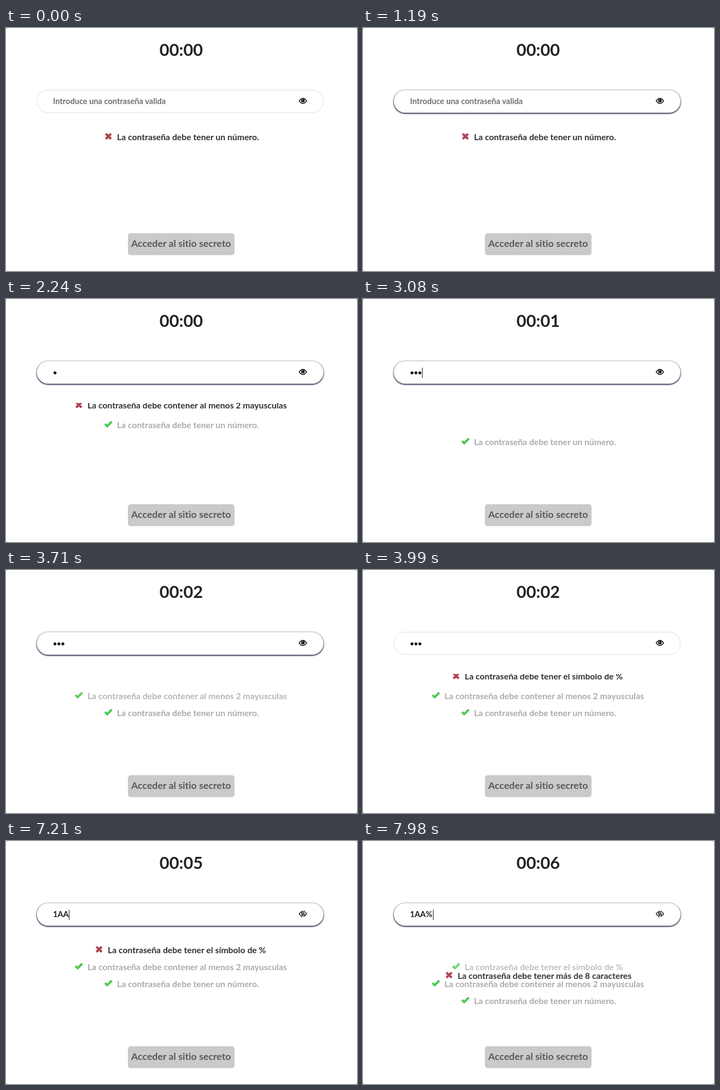
An HTML page that plays this animation: 642x444 px, repeating every 8 s.

```html
<!DOCTYPE html>
<html lang="es">
<head>
<meta charset="utf-8">
<title>Contraseña</title>
<style>
  html, body { margin: 0; width: 100%; height: 100%; overflow: hidden; background: #777; }
  svg { position: absolute; left: 0; top: 0; }
  text { font: 700 15.75px Lato, "Open Sans", sans-serif; font-variant-ligatures: none; white-space: pre; }
  #field { position: absolute; left: 56px; top: 113px; width: 523px; height: 40px;
    border: 1px solid #dfdfdf; border-radius: 21px; background: #fff; }
  #field.active { border-color: #dcdce0;
    box-shadow: 0 1.5px 2px .5px rgba(50, 40, 75, .85), 0 0 0 1px #d9d9de; }
</style>
</head>
<body>
<svg width="642" height="444"><rect width="642" height="444" rx="2.5" fill="#fff"/></svg>
<div id="field"></div>
<svg width="642" height="444" viewBox="0 0 642 444">
  <defs>
    <clipPath id="clip"><rect id="window" x="0" y="190" width="642" height="100"/></clipPath>
    <path id="cross" d="M-4.8-4.8L4.8 4.8M4.8-4.8L-4.8 4.8" stroke="#b04352" stroke-width="4.2"/>
    <path id="check" d="M-6.2-.4L-2.2 3.4L6.2-5" fill="none" stroke="#4fc853" stroke-width="4.1"/>
  </defs>
  <text id="timer" x="320.5" y="51" text-anchor="middle" fill="#222" style="font-size:30.8px"></text>
  <text id="value" x="86" y="139" style="font-size:14.6px"></text>
  <g id="dots" fill="#1c1c1c">
    <circle cx="89.6" cy="135" r="2.7"/><circle cx="96.8" cy="135" r="2.7"/><circle cx="104" cy="135" r="2.7"/>
  </g>
  <path id="caret" d="M0 125.5V144" stroke="#111" stroke-width="1"/>
  <g id="eye" fill="none" stroke="#1c1c1c" stroke-width="1.6">
    <path d="M536.3 133.2Q543 123.8 549.8 133.2Q543 142.6 536.3 133.2Z"/>
    <circle cx="543" cy="132.4" r="3.4" fill="#1c1c1c" stroke="none"/>
    <path d="M541.2 132.4Q541.3 130.6 543 130.5" stroke="#fff" stroke-width=".9"/>
  </g>
  <g id="eyeOff" fill="none" stroke="#1c1c1c" stroke-width="1.5">
    <path d="M544 128.6Q539.6 128.4 536.3 133.2Q538.2 136.2 540.8 137.4"/>
    <path d="M542.8 130Q539.8 131.3 541.4 135" stroke-width="1.7"/>
    <path d="M546.3 127.2L540.6 139.2"/>
    <path d="M547.2 129.8Q548.8 131.2 549.8 133.2Q547.6 136.8 543.8 137.7M546 132.4Q545.8 134.4 544.2 135.4"/>
  </g>
  <g id="rules" clip-path="url(#clip)"></g>
  <rect x="223" y="375" width="195" height="40" rx="5" fill="#cacaca"/>
  <text x="229" y="400" fill="#595959" style="font-size:17.75px">Acceder al sitio secreto</text>
</svg>
<script>
const LOOP = 8000;
const $ = id => document.getElementById(id);

const RULES = [
  [203, "La contraseña debe tener un número."],
  [149, "La contraseña debe contener al menos 2 mayusculas"],
  [186, "La contraseña debe tener el símbolo de %"],
  [173, "La contraseña debe tener más de 8 caracteres"]
];
const UNLOCK = [-2000, 1330, 3080, 7490];   // when each rule joins the list
const DELAY = 13;                           // before the joining rule starts to bounce
const TYPED = [[0, null], [1330, 1], [2940, 2], [3080, 3],
  [4550, "1AA"], [6160, "1AA&"], [7000, "1AA"], [7490, "1AA%"]];
const CARET = [[630, 1190, 86.5], [1330, 1870, 93.5], [2380, 2870, 93.5], [2940, 3080, 101],
  [3080, 3640, 108.5], [4970, 5460, 115.5], [6020, 6160, 115.5], [6160, 6720, 126],
  [7210, 7490, 115.5], [7490, 8000, 128.5]];
const SECOND = 1050;

function bezier(x1, y1, x2, y2) {
  const at = (a, b, s) => 3 * a * s * (1 - s) ** 2 + 3 * b * s * s * (1 - s) + s ** 3;
  return x => {
    let lo = 0, hi = 1;
    for (let i = 0; i < 24; i++) {
      const mid = (lo + hi) / 2;
      if (at(x1, x2, mid) < x) lo = mid; else hi = mid;
    }
    return at(y1, y2, lo);
  };
}
const easeOut = bezier(.215, .61, .355, 1);
const ease = bezier(.25, .1, .25, 1);

// bounce keys: progress, offset, vertical scale, opacity
const BOUNCE = [[0, 3000, 5, 0], [.6, -20, .9, 1], [.75, 10, .95, 1], [.9, -5, .985, 1], [1, 0, 1, 1]];
function bounce(p) {
  const i = Math.max(1, BOUNCE.findIndex(k => p <= k[0]));
  const a = BOUNCE[i - 1], b = BOUNCE[i];
  const e = easeOut((p - a[0]) / (b[0] - a[0]));
  return [1, 2, 3].map(n => a[n] + (b[n] - a[n]) * e);
}

const rows = RULES.map(([x, label]) => {
  const g = document.createElementNS("http://www.w3.org/2000/svg", "g");
  g.innerHTML = `<use x="${x - 15.7}" y="-2"/><text x="${x}" y="5">${label}</text>`;
  $("rules").append(g);
  return g;
});

function drawRules(t) {
  const top = UNLOCK.findLastIndex(s => t >= s);
  const p = Math.min(1, Math.max(0, (t - UNLOCK[top] - DELAY) / SECOND));
  $("window").setAttribute("height", 31 * (top + 1) - 14);
  rows.forEach((g, i) => {
    const place = top - i;
    let dy = 0, scale = 1, alpha = place < 0 ? 0 : 1;
    if (place === 0) [dy, scale, alpha] = bounce(p);
    if (place === 1) alpha = ease(p);
    g.setAttribute("transform", `translate(0 ${200 + 31 * place + dy}) scale(1 ${scale})`);
    g.setAttribute("opacity", alpha);
    g.firstChild.setAttribute("href", place ? "#check" : "#cross");
    g.lastChild.setAttribute("fill", place ? "#ababab" : "#303030");
  });
}

function drawField(t) {
  const typed = TYPED.findLast(k => t >= k[0])[1];
  const dots = typeof typed === "number" ? typed : 0;
  const shown = typeof typed === "string";
  $("field").className = t >= 1050 && t < 3990 || t >= 4340 ? "active" : "";
  $("value").textContent = shown ? typed : dots ? "" : "Introduce una contraseña valida";
  $("value").setAttribute("fill", shown ? "#1c1c1c" : "#707070");
  [...$("dots").children].forEach((c, i) => c.setAttribute("opacity", i < dots ? 1 : 0));
  $("eye").setAttribute("opacity", shown ? 0 : 1);
  $("eyeOff").setAttribute("opacity", shown ? 1 : 0);
  const caret = CARET.find(c => t >= c[0] && t < c[1]);
  $("caret").setAttribute("opacity", caret ? 1 : 0);
  if (caret) $("caret").setAttribute("transform", `translate(${caret[2]})`);
}

function frame() {
  const t = performance.now() % LOOP;
  const seconds = Math.max(0, Math.floor((t - 2380) / SECOND) + 1);
  $("timer").textContent = "00:0" + seconds;
  drawRules(t);
  drawField(t);
  requestAnimationFrame(frame);
}
frame();
</script>
</body>
</html>
```
